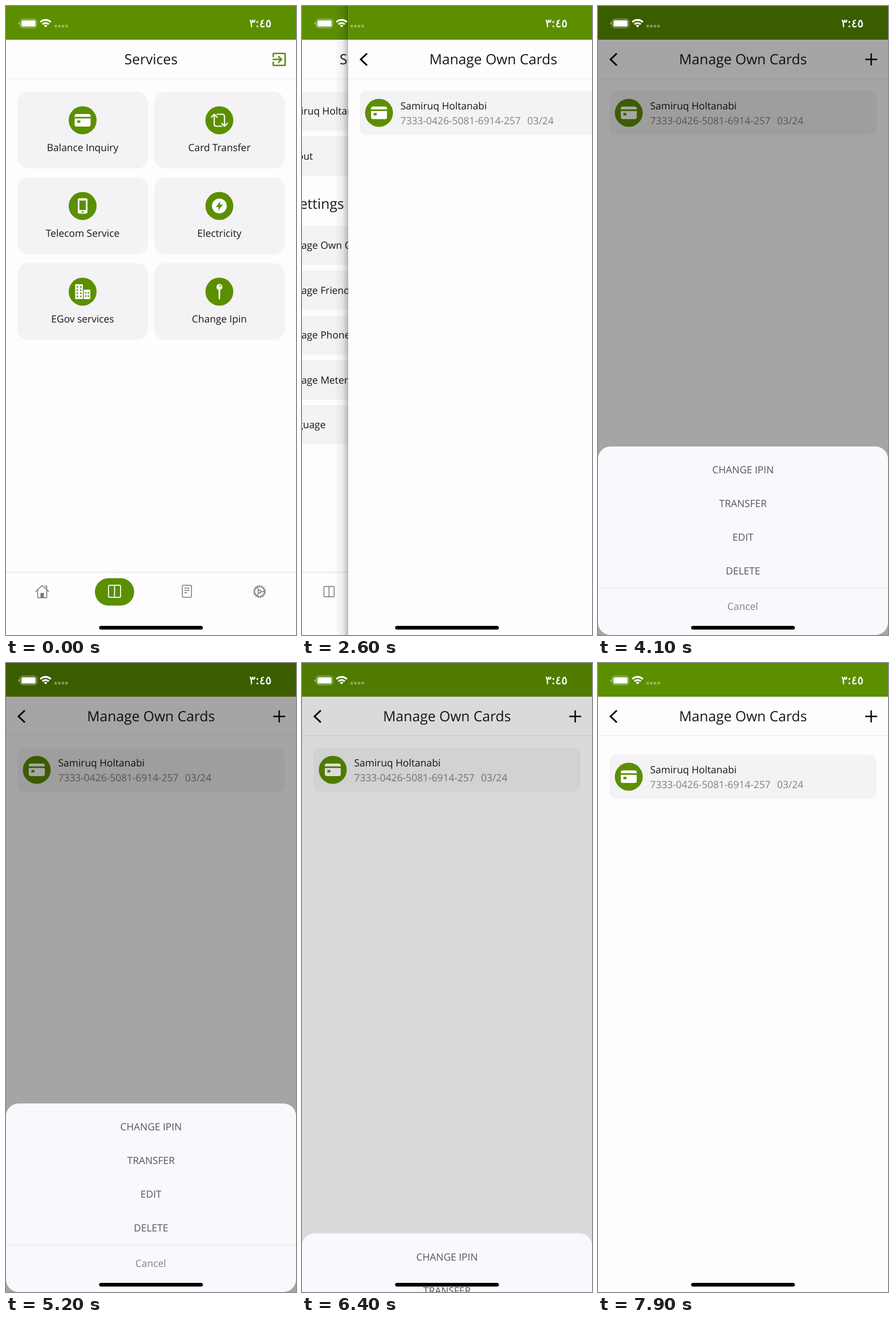
Animation of 509 by 1101 pixels, one loop 8000 ms. Source, as an HTML page:

```html
<!DOCTYPE html>
<html lang="en">
<head>
<meta charset="utf-8">
<title>Card services</title>
<style>
  html, body { margin: 0; width: 100%; height: 100%; overflow: hidden; background: #fefcfe; }
  svg { display: block; width: 100%; height: 100%; }
  text { font: 17.4px "Open Sans", "Noto Sans", sans-serif; fill: #17171a; text-rendering: geometricPrecision; }
  .title { font-size: 24.7px; }
  .mid { text-anchor: middle; }
  .sub { fill: #818084; }
  .menu { fill: #58565a; }
  .clock { font: 20px "DejaVu Sans", sans-serif; fill: #fff; stroke: #fff; stroke-width: .5; }
  .page { fill: #fefcfe; }
  .panel { fill: #f3f2f4; }
  .green { fill: #5b8f00; }
  .rule { fill: #e9e8ea; }
  .line { fill: none; stroke: currentColor; stroke-width: 1.5; stroke-linecap: round; stroke-linejoin: round; }
  .solid { fill: currentColor; }

  .anim { animation: 8s linear infinite paused; }
  #tabs { animation-name: under; }
  #pages { animation-name: swipe; }
  #tabOff { animation-name: fadeOut; }
  #tabOn { animation-name: fadeIn; }
  #cards { animation-name: push; }
  #list { animation-name: pull; }
  #dim { animation-name: dim; }
  #sheet { animation-name: sheet; }

  @keyframes swipe {
    0%, 15.6% { transform: translateX(0); animation-timing-function: ease; }
    20.6%, 100% { transform: translateX(-509px); }
  }
  @keyframes fadeOut { 0%, 15.6% { opacity: 1; } 19.5%, 100% { opacity: 0; } }
  @keyframes fadeIn { 0%, 15.6% { opacity: 0; } 19.5%, 100% { opacity: 1; } }
  @keyframes under {
    0%, 30.55% { transform: translateX(0); animation-timing-function: cubic-bezier(.35,.91,.33,.97); }
    35.55%, 100% { transform: translateX(-169.7px); }
  }
  @keyframes push {
    0%, 30.54% { transform: translateX(540px); }
    30.55% { transform: translateX(509px); animation-timing-function: cubic-bezier(.35,.91,.33,.97); }
    35.55%, 100% { transform: translateX(0); }
  }
  @keyframes dim {
    0%, 43.5% { opacity: 0; }
    45% { opacity: .25; }
    46.25% { opacity: .32; }
    47.5%, 78.1% { opacity: .35; }
    81.2%, 100% { opacity: 0; }
  }
  @keyframes sheet {
    0%, 43.9% { transform: translateY(330px); }
    45% { transform: translateY(252px); }
    46.25% { transform: translateY(80px); }
    47.5% { transform: translateY(15px); }
    48.75%, 78.1% { transform: translateY(0); animation-timing-function: ease-in-out; }
    81.2%, 100% { transform: translateY(330px); }
  }
  @keyframes pull {
    0%, 88.2% { transform: translateY(0); animation-timing-function: ease-in-out; }
    93.75% { transform: translateY(60px); animation-timing-function: ease-in-out; }
    98.75% { transform: translateY(12px); }
    100% { transform: translateY(6px); }
  }
</style>
</head>
<body>
<svg viewBox="0 0 509 1101" preserveAspectRatio="none">
  <defs>
    <linearGradient id="edge">
      <stop offset="0" stop-opacity="0"/>
      <stop offset=".6" stop-opacity=".06"/>
      <stop offset="1" stop-opacity=".26"/>
    </linearGradient>

    <!-- round badge icons, centred on the origin -->
    <g id="card">
      <rect x="-14" y="-11" width="28" height="22" rx="3.5" fill="#fff"/>
      <path class="green" d="M-14-6h28v2.8h-28z"/>
      <rect class="green" x="-9.5" y=".2" width="5.5" height="4.2" rx="1"/>
    </g>
    <g id="transfer" fill="none" stroke="#fff" stroke-width="2.1" stroke-linecap="round" stroke-linejoin="round">
      <path id="half" d="M-14-5.5l5-5 5 5M-9-10V7q0 3.5 3.5 3.5H4"/>
      <use href="#half" transform="rotate(180)"/>
    </g>
    <g id="phone">
      <rect x="-8.5" y="-13.5" width="17" height="27" rx="3" fill="#fff"/>
      <path class="green" d="M-5.7-9.5H5.7V7.2H-5.7z"/>
      <circle class="green" cy="10.3" r="1.6"/>
    </g>
    <g id="power">
      <circle r="13" fill="#fff"/>
      <path class="green" d="M2-9L-6 2h5l-1.5 7L6-2.5H.8z"/>
    </g>
    <g id="city">
      <path fill="#fff" d="M-13-13H.5v26H-13zM2-3.5h11.5V13H2z"/>
      <path d="M-9.3-9.5V10M-3.2-9.5V10M5.6 1v9M10.2 1v9" stroke="#5b8f00" stroke-width="2.6" stroke-dasharray="2.6 2.9"/>
    </g>
    <g id="pin">
      <path fill="#fff" d="M-1.8-5h3.6l-.7 18q-1.1 2.2-2.2 0z"/>
      <circle cy="-8.3" r="5.2" fill="#fff"/>
      <circle class="green" cx="1.3" cy="-10" r="1.3"/>
    </g>
    <g id="person" fill="#fff">
      <circle cy="-5.5" r="5.8"/>
      <path d="M-11 11q0-9 11-9t11 9z"/>
    </g>
    <g id="globe" fill="none" stroke="#fff" stroke-width="2">
      <circle r="12"/><ellipse rx="5" ry="12"/><path d="M-12 0h24"/>
    </g>
    <path id="exit" d="M10.1 15.6l1.4 1.4 5-5-5-5-1.4 1.4 2.6 2.6H3v2h9.7zM19 3H5a2 2 0 0 0-2 2v4h2V5h14v14H5v-4H3v4a2 2 0 0 0 2 2h14a2 2 0 0 0 2-2V5a2 2 0 0 0-2-2z" transform="scale(1.305) translate(-12 -12)"/>

    <!-- tab bar icons -->
    <g id="home" class="line">
      <path d="M-11.5 0L0-10.7 11.5 0M-8-3V10.7H8V-3M5-9.5h3V-4"/>
      <path class="solid" stroke="none" d="M-3 2.5h6v8.2h-6z"/>
    </g>
    <g id="book" class="line">
      <rect x="-9" y="-9" width="18" height="18" rx="2"/><path d="M0-9V9"/>
    </g>
    <g id="note" class="line">
      <rect x="-8" y="-10.5" width="16" height="21" rx="2"/><path d="M-4-5.5h8M-4-1.5h8M-4 2.5h4"/>
    </g>
    <g id="gear" class="line">
      <circle r="8.7"/>
      <circle r="10" stroke-dasharray="1.9 2.29" stroke-linecap="butt" stroke-width="2.4"/>
      <circle r="2.6"/>
      <path d="M2.6 0h6M-1.3-2.3l-3-5.2M-1.3 2.3l-3 5.2"/>
    </g>
  </defs>

  <g id="tabs" class="anim">
    <rect class="page" width="509" height="1101"/>
    <g id="pages" class="anim">
      <g id="services">
        <text class="title mid" x="254.5" y="102">Services</text>
        <use href="#exit" class="green" x="479.5" y="93.5"/>
      </g>
      <g id="settings" transform="translate(509)">
        <text class="title mid" x="254.5" y="102">Settings</text>
        <text class="title" x="28" y="355">General Settings</text>
      </g>
    </g>
    <rect class="green" width="509" height="59"/>
    <rect class="rule" y="127" width="509" height="1"/>
    <rect class="page" y="991" width="509" height="110"/>
    <rect y="990.5" width="509" height="1.3" fill="#e0dfe1"/>
    <g color="#77767a">
      <use href="#home" x="63.5" y="1025"/>
      <use href="#book" x="190" y="1025"/>
      <use href="#note" x="317.5" y="1024.5"/>
      <use href="#gear" x="445" y="1025"/>
    </g>
    <g id="tabOff" class="anim" color="#fff">
      <rect class="green" x="156" y="1001.5" width="69" height="48" rx="24"/>
      <use href="#book" transform="translate(190.5 1024.5) scale(1.18)"/>
    </g>
    <g id="tabOn" class="anim" color="#fff">
      <rect class="green" x="411" y="1001.5" width="69" height="48" rx="24"/>
      <use href="#gear" transform="translate(445.5 1024.5) scale(1.18)"/>
    </g>
  </g>

  <g id="cards" class="anim">
    <rect x="-25" width="25" height="1101" fill="url(#edge)"/>
    <rect class="page" width="509" height="1101"/>
    <rect class="green" width="509" height="59"/>
    <rect class="rule" y="127" width="509" height="1"/>
    <path d="M33 83L22 93.5 33 104" fill="none" stroke="#0a0a0c" stroke-width="3.1"/>
    <text class="title mid" x="254.5" y="102">Manage Own Cards</text>
    <path d="M469 93.5h21M479.5 83v21" stroke="#0a0a0c" stroke-width="2.5"/>
    <g id="list" class="anim">
      <rect class="panel" x="20" y="148" width="469" height="78" rx="13"/>
      <circle class="green" cx="54" cy="187" r="24.5"/>
      <use href="#card" x="54" y="187"/>
      <text x="91.5" y="180.5">Samiruq Holtanabi</text>
      <text class="sub" x="91.5" y="206.5">7333-0426-5081-6914-257</text>
      <text class="sub" x="314.3" y="206.5">03/24</text>
    </g>
  </g>

  <rect id="dim" class="anim" width="509" height="1101"/>
  <g id="sheet" class="anim">
    <rect y="771" width="509" height="330" rx="22" fill="#faf8fc"/>
    <text class="mid menu" x="254.5" y="818.3">CHANGE IPIN</text>
    <text class="mid menu" x="254.5" y="877.3">TRANSFER</text>
    <text class="mid menu" x="254.5" y="936.3">EDIT</text>
    <text class="mid menu" x="254.5" y="995.3">DELETE</text>
    <rect y="1018.5" width="509" height="1.2" fill="#e5e3e8"/>
    <text class="mid sub" x="254" y="1057">Cancel</text>
  </g>

  <!-- system overlay -->
  <g fill="#fff">
    <rect x="25" y="23" width="29" height="15" rx="4.2" fill="none" stroke="#fff" stroke-opacity=".65"/>
    <rect x="27" y="25" width="25" height="11" rx="2.6"/>
    <path d="M23.3 28v5q-1.6-.6-1.6-2.5t1.6-2.5z" opacity=".65"/>
    <g transform="translate(69.5 37.5)" fill="none" stroke="#fff" stroke-width="3.2">
      <path d="M-9.3-9.3a13.2 13.2 0 0 1 18.6 0M-5.5-5.5a7.8 7.8 0 0 1 11 0"/>
      <path d="M0 0l-3-3.2a4.4 4.4 0 0 1 6 0z" fill="#fff" stroke="none"/>
    </g>
    <path d="M85 35.3h24" stroke="#fff" stroke-width="4.4" stroke-dasharray="4.4 2" opacity=".36"/>
    <text class="clock mid" x="446.5" y="36.5">٣:٤٥</text>
  </g>
  <rect x="163.5" y="1085" width="182" height="6.4" rx="3.2" fill="#000"/>
</svg>
<script>
  const byId = id => document.getElementById(id);
  const badge = (icon, x, y) =>
    `<circle class="green" cx="${x}" cy="${y}" r="24.5"/><use href="#${icon}" x="${x}" y="${y}"/>`;

  const services = [
    ['card', 'Balance Inquiry'], ['transfer', 'Card Transfer'],
    ['phone', 'Telecom Service'], ['power', 'Electricity'],
    ['city', 'EGov services'], ['pin', 'Change Ipin']
  ];
  byId('services').innerHTML += services.map(([icon, label], i) => {
    const x = 20 + i % 2 * 240, y = 150 + (i >> 1) * 150;
    return `<rect class="panel" x="${x}" y="${y}" width="229.5" height="134.5" rx="20"/>` +
      badge(icon, x + 114.5, y + 50) +
      `<text class="mid" x="${x + 114.5}" y="${y + 103.7}">${label}</text>`;
  }).join('');

  const settings = [
    ['person', 'Samiruq Holtanabi'], ['pin', 'Logout'],
    ['card', 'Manage Own Cards'], ['card', 'Manage Friends Cards'],
    ['phone', 'Manage Phones'], ['power', 'Manage Meters'], ['globe', 'Language']
  ];
  byId('settings').innerHTML += settings.map(([icon, label], i) => {
    const y = 150 + i * 78.6 + (i > 1 ? 77.3 : 0);
    return `<rect class="panel" x="20" y="${y}" width="469" height="68.5" rx="13"/>` +
      badge(icon, 54, y + 34.2) + `<text x="105.5" y="${y + 40.4}">${label}</text>`;
  }).join('');

  const LOOP = 8000, TICK = 100, SLACK = 5;
  const motions = document.getAnimations();
  function draw() {
    const time = Math.floor((performance.now() + SLACK) / TICK) * TICK % LOOP;
    for (const motion of motions) motion.currentTime = time;
    requestAnimationFrame(draw);
  }
  draw();
</script>
</body>
</html>
```
